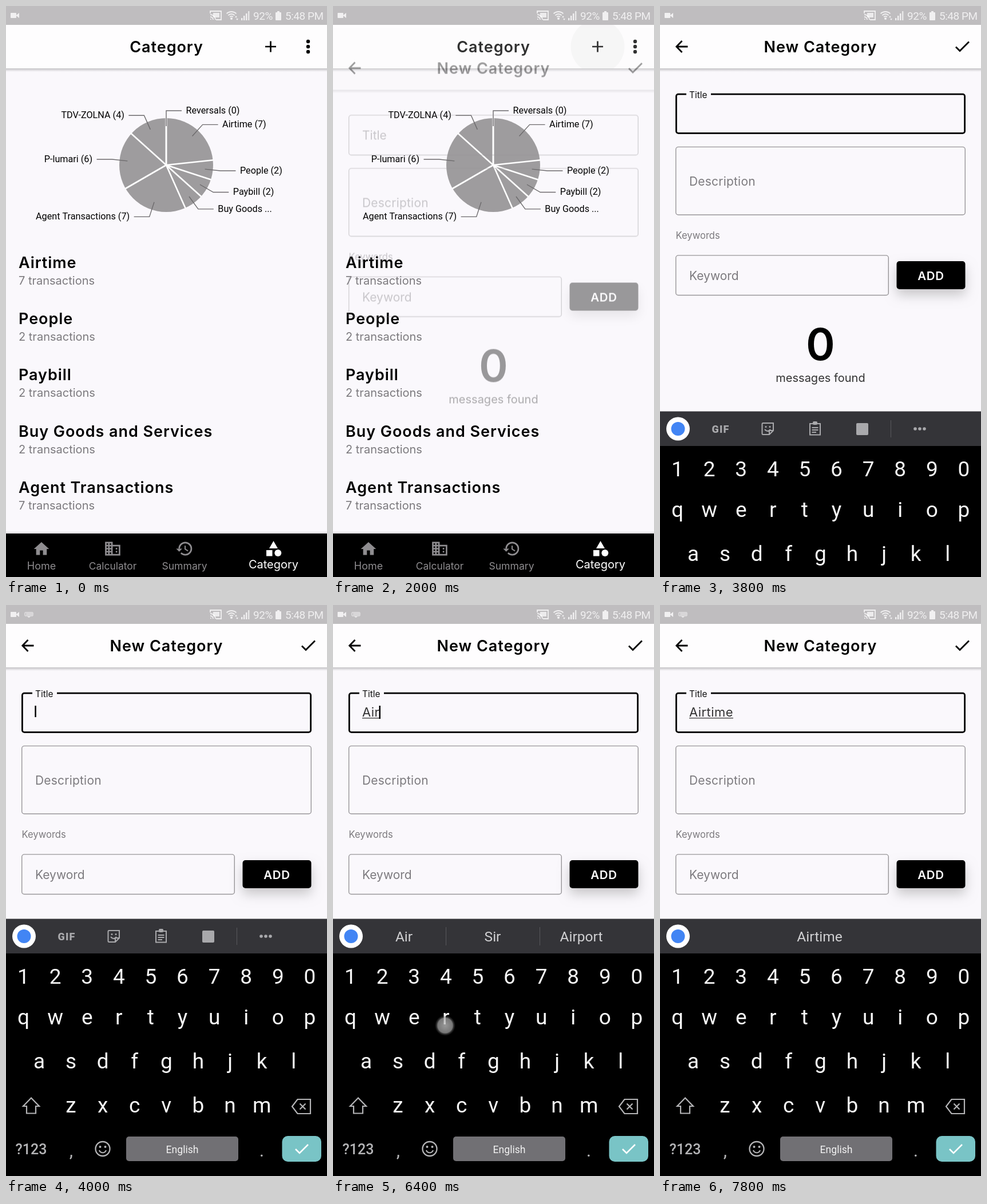
Recreate the animation shown at these times as an HTML page with a canvas. Size 561 by 998 pixels, loop 8 s.

```html
<!DOCTYPE html>
<html lang="en">
<head>
<meta charset="utf-8">
<title>Category screen</title>
<style>
  html, body { margin: 0; width: 100%; height: 100%; overflow: hidden; background: #faf8fc; }
  canvas { display: block; width: 100vw; height: 100vh; }
</style>
</head>
<body>
<canvas id="stage" width="561" height="998"></canvas>
<script>
const stage = document.getElementById('stage').getContext('2d');
const buffer = Object.assign(document.createElement('canvas'), { width: 561, height: 998 }).getContext('2d');
let ctx = stage;

const LOOP = 8000, TICK = 200;
const BG = '#faf8fc', GREY = '#7c7a7e', KEY_GREY = '#b4b4b6';
const UI = 'Inter, sans-serif', SYS = 'Roboto, sans-serif';

const slices = [['Reversals', 0], ['Airtime', 7], ['People', 2], ['Paybill', 2], ['Buy Goods …', 2],
  ['Agent Transactions', 7], ['P-lumari', 6], ['TDV-ZOLNA', 4]];
const categories = [['Airtime', 7], ['People', 2], ['Paybill', 2], ['Buy Goods and Services', 2], ['Agent Transactions', 7]];

// start, typed text, suggestions
const typing = [
  [0, '', null],
  [6000, 'A', ['A', 'An', 'As']],
  [6200, 'Ai', ['Ai', 'Air', 'Aid']],
  [6400, 'Air', ['Air', 'Sir', 'Airport']],
  [6800, 'Airt', ['Airt', 'Airtime', 'Airport']],
  [7000, 'Airti', ['Airti', 'Airtime', 'Airtight']],
  [7200, 'Airtim', ['Airtim', 'Airtime', 'Airtight']],
  [7400, 'Airtime', ['', 'Airtime', '']]
];
// start, end, x, y, strength
const touches = [
  [5200, 5400, 36, 886, 0.45], [5800, 6200, 74, 783, 0.8], [6200, 6400, 420, 735, 0.8],
  [6400, 6600, 196, 735, 0.8], [6600, 6800, 256, 735, 0.8], [6800, 7000, 420, 735, 0.8],
  [7000, 7400, 441, 885, 0.8], [7400, 7600, 139, 734, 0.8]
];
// start, end, x, y, letter
const popups = [[5800, 6000, 57, 800, 'A'], [6600, 6800, 252, 722, 't'], [7000, 7200, 446, 877, 'm']];
const cursorOn = [[4000, 4200], [4800, 5200], [5800, 7800]];

const during = (t, [start, end]) => t >= start && t < end;

function text(str, x, y, size, color, { font = UI, weight = 400, align = 'left', spacing = 0 } = {}) {
  ctx.font = `${weight} ${size}px ${font}`;
  ctx.letterSpacing = spacing * size + 'px';
  ctx.textAlign = align;
  ctx.fillStyle = color;
  ctx.fillText(str, x, y);
  return ctx.measureText(str).width;
}
const heading = (str, x, y, align) => text(str, x, y, 27, '#000', { weight: 600, spacing: 0.035, align });
const sys = (str, x, y, size, color, align = 'center', weight = 400) =>
  text(str, x, y, size, color, { font: SYS, align, weight });

function fill(path, color) {
  ctx.fillStyle = color;
  ctx.fill(new Path2D(path));
}
function stroke(path, color, width) {
  ctx.strokeStyle = color;
  ctx.lineWidth = width;
  ctx.stroke(new Path2D(path));
}
function rect(x, y, w, h, color, radius = 0) {
  ctx.fillStyle = color;
  ctx.beginPath();
  ctx.roundRect(x, y, w, h, radius);
  ctx.fill();
}
// The border lies inside the given box.
function frame(x, y, w, h, color, width, radius = 5) {
  ctx.strokeStyle = color;
  ctx.lineWidth = width;
  ctx.beginPath();
  ctx.roundRect(x + width / 2, y + width / 2, w - width, h - width, radius - width / 2);
  ctx.stroke();
}
function disc(x, y, r, color) {
  ctx.fillStyle = color;
  ctx.beginPath();
  ctx.arc(x, y, r, 0, 7);
  ctx.fill();
}
function ring(x, y, r, color, width, from = 0, to = 2 * Math.PI) {
  ctx.strokeStyle = color;
  ctx.lineWidth = width;
  ctx.beginPath();
  ctx.arc(x, y, r, from, to);
  ctx.stroke();
}
function layer(draw, dx = 0, dy = 0, alpha = 1, scale = 1) {
  ctx.save();
  ctx.translate(dx, dy);
  ctx.scale(scale, scale);
  ctx.globalAlpha *= alpha;
  draw();
  ctx.restore();
}
// Fades a drawing as one flat picture.
function group(draw, dy, alpha) {
  ctx = buffer;
  ctx.clearRect(0, 0, 561, 998);
  draw();
  ctx = stage;
  layer(() => ctx.drawImage(buffer.canvas, 0, 0), 0, dy, alpha);
}
function shadow(color, blur, dy) {
  ctx.shadowColor = color;
  ctx.shadowBlur = blur;
  ctx.shadowOffsetY = dy;
}

function header(alpha = 1) {
  const edge = ctx.createLinearGradient(0, 109, 0, 115);
  edge.addColorStop(0, 'rgba(0,0,0,.22)');
  edge.addColorStop(1, 'rgba(0,0,0,0)');
  rect(0, 109, 561, 6, edge);
  layer(() => rect(0, 0, 561, 109, '#fefdfe'), 0, 0, alpha);
}

function statusBar(t) {
  const white = '#f1f0f1';
  rect(0, 0, 561, 33, '#bfbdbf');
  rect(8, 12, 10, 9, white, 1);
  fill('M18 16L23 12V21L18 17Z', white);
  if (t >= 4000) {
    frame(32.5, 12.5, 15, 7, white, 1, 1);
    stroke('M35 15H46M35 17H46', white, 1);
    fill('M37 20H43L40 22Z', white);
  }
  stroke('M357 13V9H376V24H367', white, 1.8);
  [0, 4, 8].forEach(r => ring(357, 24, r + 1, white, 1.8, -Math.PI / 2, 0));
  rect(362, 12, 11, 8, 'rgba(255,255,255,.7)');
  [4, 8, 12].forEach(r => ring(394, 22, r, white, 1.8, -2.35, -0.79));
  disc(394, 22, 2, white);
  fill('M400 20L402 17L404 20ZM402 22H406L404 25Z', white);
  for (let i = 0; i < 4; i++) rect(411 + 4 * i, 21 - 4 * i, 2.4, 4 + 4 * i, i < 3 ? white : 'rgba(255,255,255,.65)');
  rect(471, 11, 10, 14, white, 1);
  rect(474, 9, 4, 3, white);
  text('92%', 432, 24, 19, white, { font: SYS, spacing: -0.025 });
  text('5:48 PM', 488, 24, 19, white, { font: SYS, spacing: -0.025 });
}

function navBar() {
  const dim = '#8f8d90';
  rect(0, 919, 561, 3, '#e6e4e7');
  rect(0, 922, 561, 76, '#000');
  layer(() => fill('M10 20v-6h4v6h5v-8h3L12 3 2 12h3v8z', dim), 46, 933, 1, 1.33);
  layer(() => {
    stroke('M3 4H11V20H3ZM12 8H21V20H12M2 8H12M2 12H12M2 16H12M7 4V20', dim, 2);
    rect(16, 11, 2, 2, dim);
    rect(16, 15, 2, 2, dim);
  }, 170.5, 932.5, 1, 1.33);
  layer(() => {
    ring(13, 12, 8, dim, 2, -Math.PI, 2.35);
    fill('M1 12H9L5 16Z', dim);
    stroke('M12.8 8V12.6L16.6 15', dim, 1.5);
  }, 296, 932.5, 1, 1.33);
  fill('M467.5 935L475 948H460ZM455 951H465.5V961.5H455Z', '#fff');
  disc(475.3, 956, 6, '#fff');
  [['Home', 62, 18], ['Calculator', 186.5, 17.4], ['Summary', 312, 17.6]].forEach(([label, x, size]) =>
    text(label, x, 985, size, dim, { align: 'center' }));
  text('Category', 467.5, 983, 20, '#fff', { align: 'center' });
}

function pie() {
  const cx = 280, cy = 278, turn = 2 * Math.PI / 30;
  disc(cx, cy, 82, '#9e9c9e');
  let sum = 0;
  ctx.strokeStyle = '#fff';
  ctx.lineWidth = 2.6;
  slices.forEach(([, count]) => {
    ctx.beginPath();
    ctx.moveTo(cx, cy);
    ctx.lineTo(cx + 83 * Math.sin(sum * turn), cy - 83 * Math.cos(sum * turn));
    ctx.stroke();
    sum += count;
  });
  sum = 0;
  slices.forEach(([name, count]) => {
    const angle = (sum + count / 2) * turn, dx = Math.sin(angle), dy = -Math.cos(angle);
    const side = dx < 0 ? -1 : 1, x = cx + 95 * dx, y = cy + 95 * dy;
    stroke(`M${cx + 68 * dx} ${cy + 68 * dy}L${x} ${y}H${x + 27 * side}`, '#6c6a6c', 1.4);
    const label = name.endsWith('…') ? name.replace('…', '...') : `${name} (${count})`;
    sys(label, x + 34.5 * side, y + 4.8, 16.2, '#000', side < 0 ? 'right' : 'left');
    sum += count;
  });
}

function categoryScreen(t) {
  header();
  heading('Category', 280.5, 80.5, 'center');
  if (t >= 1400) {
    layer(() => {
      ctx.beginPath();
      ctx.rect(0, 0, 561, 109);
      ctx.clip();
      disc(462.5, 71, 47, 'rgba(0,0,0,.03)');
    });
  }
  stroke('M453 71H472M462.5 61.5V80.5', '#000', 2.7);
  [62, 71, 80].forEach(y => disc(528, y, 3.2, '#000'));
  pie();
  categories.forEach(([name, count], i) => {
    const y = 458 + 98.2 * i;
    heading(name, 22, y);
    text(`${count} transactions`, 22, y + 29, 20, GREY);
  });
  if (during(t, [1200, 1800])) lightTouch(445, 61, t < 1600 ? 1 : 0.6);
}

function lightTouch(x, y, alpha) {
  layer(() => {
    disc(x, y, 15, 'rgba(255,255,255,.6)');
    ring(x, y, 15.5, '#c8cfe2', 2);
  }, 0, 0, alpha);
}

function formScreen(t, typed) {
  const outline = '#989699', focused = t >= 3800;
  header(t < 2200 ? 0.5 : 1);
  heading('New Category', 280.5, 80.5, 'center');
  stroke('M48.5 71H29M38.5 61L28.8 71L38.5 81', '#000', 2.8);
  stroke('M517 71.5L524 78.5L540 62.5', '#000', 2.8);

  frame(27, 152.7, 507, 71, focused ? '#000' : outline, focused ? 2.8 : 1.4);
  if (focused) {
    rect(46, 151, 43, 6, BG);
    text('Title', 51, 161, 15.5, '#111');
    const width = typed ? text(typed, 51, 195, 22, '#333', { spacing: 0.02 }) : 0;
    if (typed) rect(51, 197, width, 1.3, '#333');
    if (cursorOn.some(span => during(t, span))) rect(50.3 + width, 176, 2.5, typed ? 23 : 20, '#000');
  } else {
    text('Title', 51, 196, 21, GREY);
  }
  frame(27, 245.7, 507, 120, outline, 1.4);
  text('Description', 51, 314, 21, GREY, { spacing: 0.01 });
  text('Keywords', 27.5, 406.5, 16.6, GREY);
  frame(27, 435.2, 373, 71, outline, 1.4);
  text('Keyword', 51, 479, 21, GREY);
  layer(() => {
    shadow('rgba(0,0,0,.2)', 20, 10);
    rect(413.5, 446, 120, 49, '#000', 5);
  });
  text('ADD', 473.5, 479, 20.5, '#fff', { weight: 600, spacing: 0.03, align: 'center' });
  text('0', 280.5, 618.5, 77, '#000', { weight: 600, align: 'center' });
  text('messages found', 280.5, 656.5, 20, '#333', { align: 'center' });
  if (during(t, [3600, 3800])) lightTouch(382.5, 194, 1);
}

function toolbar() {
  const grey = '#a9a9ac';
  text('GIF', 106, 585.5, 18, grey, { font: SYS, weight: 900, align: 'center', spacing: 0.06 });
  stroke('M180 569H198V582L191 589H180Q178.5 589 178.5 587V571Q178.5 569 180 569ZM198 582H191V589M183 580Q188 586 193 580', grey, 2);
  disc(185, 575.5, 1.5, grey);
  disc(192, 575.5, 1.5, grey);
  stroke('M262 570H280V589.5H262ZM265.5 577H276.5M265.5 581H276.5M265.5 585H273', grey, 2);
  rect(267, 566, 8, 6, grey, 2);
  rect(343, 569, 21, 21, grey, 2);
  rect(403, 564, 1, 30, '#58585c');
  [446, 454, 462].forEach(x => disc(x, 579, 2.8, grey));
}

function suggestionBar(words) {
  words.forEach((word, i) => sys(word, [124, 279, 434][i], 588, 24.5, '#d0d0d2'));
  if (words[0]) [197, 361].forEach(x => rect(x, 563, 1, 32, '#58585c'));
}

function keyRow(keys, x, y) {
  [...keys].forEach((key, i) => sys(key, x + 55.6 * i, y, 37, '#f7f7f7'));
}

function keyboard(t, suggestions) {
  const upper = during(t, [5200, 6000]), lift = upper ? 3 : 0;
  const cased = s => upper ? s.toUpperCase() : s;
  rect(0, 548.5, 561, 60.5, '#343438');
  rect(0, 609, 561, 389, '#000');
  disc(31.5, 579, 20.5, '#fff');
  disc(31.5, 579, 12, '#4285f4');
  suggestions ? suggestionBar(suggestions) : toolbar();

  keyRow(upper ? '!@#$%^&*()' : '1234567890', 30.5, 662);
  keyRow(cased('qwertyuiop'), 30.5, 733 + lift);
  keyRow(cased('asdfghjkl'), 58, 810 + lift);
  keyRow(cased('zxcvbnm'), 113.5, 887 + lift);

  const shift = 'M44 861.5L58 876H52V888.5H36V876H30Z';
  if (upper) fill(shift, KEY_GREY);
  stroke(shift, KEY_GREY, 2.2);
  stroke('M500 876.5L509.5 864H532V889H509.5ZM513.5 871.5L523.5 881.5M523.5 871.5L513.5 881.5', KEY_GREY, 2.2);
  sys('?123', 44, 960, 25, KEY_GREY, 'center', 500);
  sys(',', 114, 964, 32, KEY_GREY);
  ring(169, 950.5, 12.5, KEY_GREY, 2.3);
  disc(164.5, 947, 2, KEY_GREY);
  disc(173.5, 947, 2, KEY_GREY);
  ring(169, 951, 6.3, KEY_GREY, 2, 0.3, Math.PI - 0.3);
  rect(210, 929, 196, 43, '#717074', 5);
  sys('English', 308, 957.5, 17.6, '#f2f2f2');
  sys('.', 447, 964, 32, KEY_GREY);
  rect(482.5, 928, 68.5, 45, '#79c4c6', 10);
  stroke('M506 951L513 958L528 943', '#fff', 2.6);

  popups.filter(p => during(t, p)).forEach(([, , x, y, letter]) => {
    rect(x - 31, y - 113, 62, 144, '#343438', 8);
    sys(letter, x, y - 60, 40, '#fff');
  });
  touches.filter(p => during(t, p)).forEach(([, , x, y, strength]) => {
    const glow = ctx.createRadialGradient(x, y, 0, x, y, 18);
    glow.addColorStop(0, 'rgba(200,200,200,.95)');
    glow.addColorStop(0.72, 'rgba(165,165,165,.9)');
    glow.addColorStop(0.82, 'rgba(110,110,110,.6)');
    glow.addColorStop(1, 'rgba(80,80,80,0)');
    layer(() => disc(x, y, 18, glow), 0, 0, strength);
  });
}

function render(now) {
  const t = Math.floor(now % LOOP / TICK) * TICK;
  const [, typed, suggestions] = typing.filter(step => t >= step[0]).pop();
  rect(0, 0, 561, 998, BG);
  if (t < 2200) categoryScreen(t);
  if (during(t, [2000, 2200])) group(() => formScreen(t, typed), 37.5, 0.39);
  if (t >= 2200) formScreen(t, typed);
  statusBar(t);
  navBar();
  if (t >= 3800) layer(() => keyboard(t, suggestions), 0, t < 4000 ? 160 : 0);
}

const start = performance.now();
function loop() {
  render(performance.now() - start);
  requestAnimationFrame(loop);
}
loop();
</script>
</body>
</html>
```
